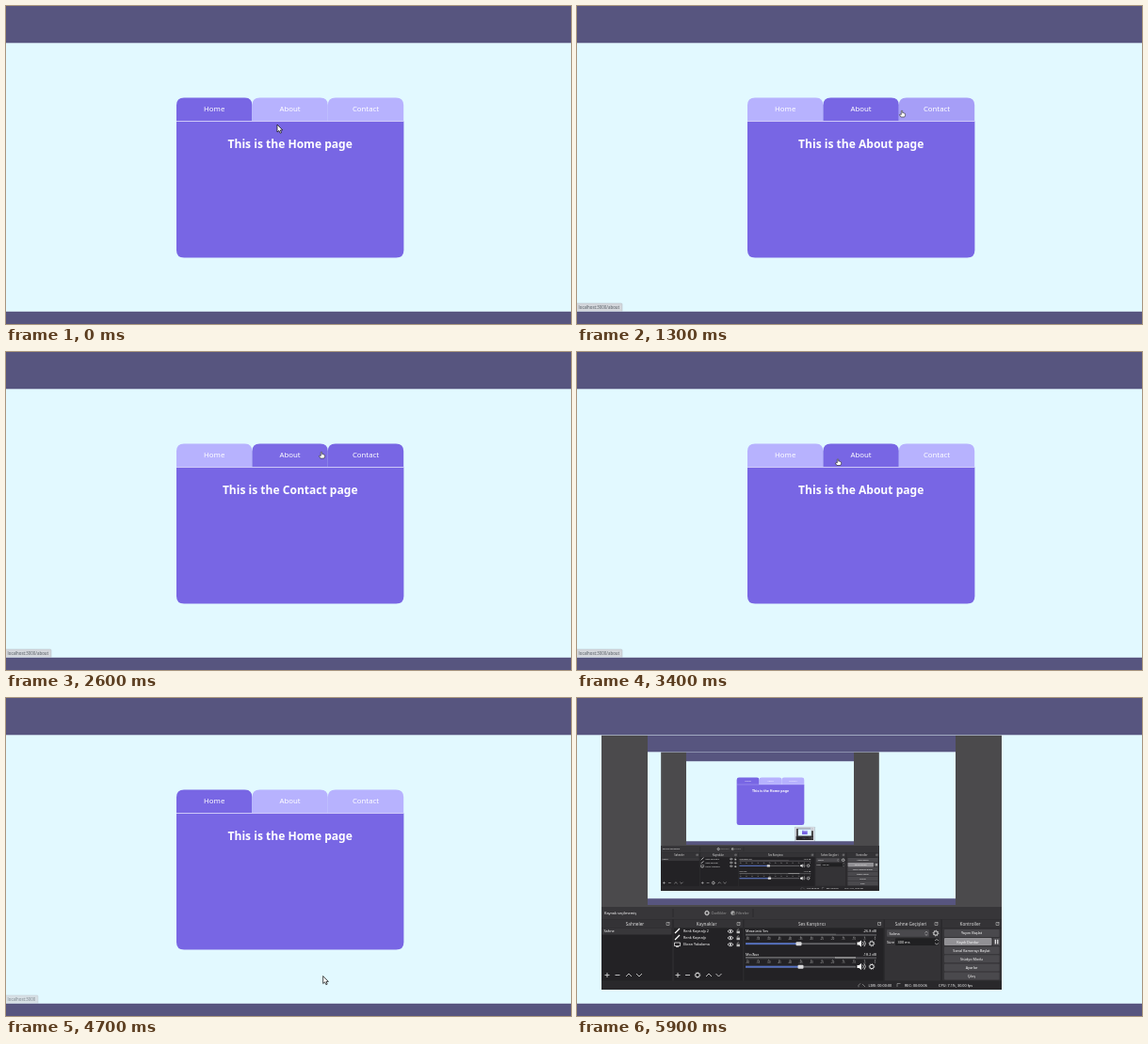
Write an HTML page that moves like this. It is 600 px wide and 338 px high and loops after 6 s.

```html
<!DOCTYPE html>
<html lang="en">
<head>
<meta charset="utf-8">
<title>Tab navigation</title>
<style>
html, body { margin: 0; width: 100%; height: 100%; overflow: hidden; background: #e2f9ff; }
svg { display: block; }
#stage { width: 100vw; height: 100vh; }
text { font-family: "Noto Sans", "Open Sans", sans-serif; }
</style>
</head>
<body>
<svg id="stage" viewBox="0 0 600 338"></svg>
<script>
const DARK = [120, 102, 228], LIGHT = [183, 178, 254];
const TABS = ["Home", "About", "Contact"];
const LOOP = 6000, STEP = 100, FADE = 300;

const rect = (x, y, w, h, fill, extra = "") =>
  `<rect x="${x}" y="${y}" width="${w}" height="${h}" fill="${fill}" ${extra}/>`;
const text = (x, y, s, size, fill = "#fff", anchor = "start", extra = "") =>
  `<text x="${x}" y="${y}" font-size="${size}" fill="${fill}" text-anchor="${anchor}" ${extra}>${s}</text>`;
const line = (d, color = "#e4e4e4", width = .8) =>
  `<path d="${d}" fill="none" stroke="${color}" stroke-width="${width}"/>`;
const mix = k => `rgb(${LIGHT.map((c, i) => Math.round(c + (DARK[i] - c) * k))})`;

function tab(name, i) {
  const x = 181 + i * 80.4;
  return `<path class="tab" fill="${mix(i ? 0 : 1)}"
    d="M${x} 122.5V105.5q0-8 8-8h64.4q8 0 8 8v17z"/>` +
    text(x + 40.2, 111.7, name, 7.8, "#fff", "middle");
}

const page = () => rect(0, 0, 600, 338, "#e2f9ff") + TABS.map(tab).join("") +
  `<path d="M181 122.5h241.4v137q0 8-8 8H189q-8 0-8-8z" fill="${mix(1)}"/>` +
  rect(181, 122, 241.4, .9, "#d5d0fa") +
  text(301.7, 150.6, "This is the Home page", 12.05, "#fff", "middle", 'class="title" font-weight="700"');

const bars = () => rect(0, 0, 600, 39, "#57557f") + rect(0, 39, 600, .8, "#b5bed3") +
  rect(0, 325, 600, 13, "#57557f") + rect(0, 324.4, 600, .6, "#b5bed3");

const gear = (x, y, r = 2.2) =>
  `<circle cx="${x}" cy="${y}" r="${r}" fill="none" stroke="#e4e4e4" stroke-width="1"/>` +
  `<circle cx="${x}" cy="${y}" r="${r + .7}" fill="none" stroke="#e4e4e4" stroke-width=".7" stroke-dasharray="1.1 1.1"/>`;
const plus = x => line(`M${x - 2.5} 294.5h5M${x} 292v5`);
const minus = x => line(`M${x - 2.5} 294.5h5`);
const chevron = (x, up) => line(up ? `M${x - 3} 296l3-3 3 3` : `M${x - 3} 293l3 3 3-3`);

function dock(x, w, title) {
  return rect(x, 235.5, w, 9, "#343336") + rect(x, 244.5, w, 56, "#232225") +
    text(x + w / 2 - 2, 241.8, title, 4.7, "#ddd", "middle") +
    line(`M${x + w - 6} 238.5h3v3h-3zM${x + w - 4.5} 240l1.8-1.8`, "#ccc", .5);
}

function source(name, i) {
  const y = 248 + i * 7;
  const icon = i < 2 ? line(`M104 ${y + 2}l1.5-1.5 3.5-3.5`, "#fff", 1.3)
    : line(`M103.5 ${y - 2}h6v3.5h-6zM105 ${y + 2.5}h3`, "#fff", .7);
  return icon + text(113, y + 1.4, name, 3.75) +
    line(`M160 ${y}q3-3.6 6 0q-3 3.6-6 0`, "#fff", .7) +
    `<circle cx="163" cy="${y}" r=".9" fill="#fff"/>` +
    rect(169.5, y - .4, 3.4, 2.6, "#bbb") + line(`M170.2 ${y - .4}v-1.2q1-1.4 2 0`, "#bbb", .6);
}

function mixer(y, name, level, knob) {
  let ticks = "";
  for (let i = 0; i <= 12; i++) {
    const x = 181 + i * 11.3;
    ticks += `M${x} ${y + 5.4}v1.2`;
  }
  let labels = "";
  for (let i = 0; i < 13; i++) labels += text(181 + i * 11.3, y + 9.4, i < 12 ? i * 5 - 60 : 0, 2.6, "#bbb", "middle");
  return text(179, y + 1.3, name, 3.75) + text(318, y + 1.3, level, 3.75, "#fff", "end") +
    rect(179, y + 2.8, 139, 2, "#4d4c50") + rect(179, y + 2.8, 96, .7, "#777") +
    line(ticks, "#ccc", .4) + labels +
    rect(179, y + 12.3, 117, 1.8, "#656569") + rect(179, y + 12.3, knob - 179, 1.8, "#536fc2") +
    rect(knob - 3, y + 11.2, 6, 4, "#d8d8da", 'rx="1"') +
    `<path d="M297.5 ${y + 11.6}h2l2.5-2v7l-2.5-2h-2z" fill="#fff"/>` +
    line(`M303.4 ${y + 11}q1.8 2 0 4M305 ${y + 9.8}q2.8 3.2 0 6.4`, "#fff", .7) + gear(313, y + 13);
}

function button(label, i) {
  const y = 246 + i * 9.1, on = i === 1;
  return rect(390, y, on ? 50.5 : 58.5, 8, on ? "#929195" : "#4a494d", 'rx="1"') +
    text(on ? 415 : 419, y + 5.4, label, 3.8, "#fff", "middle");
}

// Recorder window whose preview shows the given stage markup.
function recorder(preview) {
  return rect(26, 39, 425, 271, "#4b4a4c") +
    `<svg x="75" y="39" width="327" height="181" viewBox="0 5.5 600 332.1">${preview}</svg>` +
    rect(26, 222, 425, 88, "#2b2a2d") + rect(26, 222, 425, 13, "#373639") +
    text(29, 230, "Kaynak seçilmemiş", 3.85) + line("M102 224v9M187 224v9", "#222", .6) +
    gear(138, 228.5, 1.8) + text(142.5, 230, "Özellikler", 3.75, "#999") +
    `<circle cx="165.5" cy="228.5" r="2.2" fill="#aaa"/><circle cx="166.8" cy="229.3" r="1.5" fill="#666"/>` +
    text(169, 230, "Filtreler", 3.75, "#999") +
    dock(26, 75, "Sahneler") + dock(103, 73, "Kaynaklar") + dock(177.5, 148, "Ses Karıştırıcı") +
    dock(327, 59, "Sahne Geçişleri") + dock(388, 63, "Kontroller") +
    rect(26.5, 244.5, 74, 7, "#38373a") + text(28.5, 249.4, "Sahne", 3.85) +
    ["Renk Kaynağı 2", "Renk Kaynağı", "Ekran Yakalama"].map(source).join("") +
    plus(32) + minus(43) + chevron(55, true) + chevron(66, false) +
    plus(107) + minus(117.5) + gear(128, 294.5) + chevron(140, true) + chevron(150.5, false) +
    mixer(248, "Masaüstü Ses", "-26.8 dB", 235.5) + mixer(272.5, "Mic/Aux", "-18.2 dB", 237.5) +
    rect(274, 275.3, 22, 1.2, "#aaa") +
    rect(327, 244.5, 59, 56, "#343336") + rect(388, 244.5, 63, 56, "#343336") +
    rect(329, 246.3, 45, 7.4, "#4a494d", 'rx="1"') + text(331.5, 251.5, "Solma", 3.85) +
    line("M369.5 249.5l1.5-1.3 1.5 1.3M369.5 251l1.5 1.3 1.5-1.3", "#ddd", .5) + gear(381, 250) +
    text(329, 260.5, "Süre", 3.85) + rect(338, 255.3, 46, 7.6, "#202022", 'rx="1"') +
    text(340.5, 260.6, "300 ms", 3.85) +
    line("M380 258l2-1.6 2 1.6M380 260.5l2 1.6 2-1.6", "#ddd", .6) +
    ["Yayını Başlat", "Kaydı Durdur", "Sanal Kamerayı Başlat", "Stüdyo Modu", "Ayarlar", "Çıkış"].map(button).join("") +
    rect(442, 255.1, 7, 8, "#4a494d") + line("M444.3 256.8v4.6M446.8 256.8v4.6", "#fff", 1.1) +
    rect(26, 301.5, 425, 8.5, "#29282b") +
    line("M299 307.3v-2l2-2M303 304l3 3M340 307v-3.5h3.5", "#aaa", .6) +
    text(309.5, 307.3, "LIVE: 00:00:00", 3.8) + text(348, 307.3, "REC: 00:00:06", 3.8) +
    text(384, 307.3, "CPU: 7.1%, 30.00 fps", 3.8);
}

const thumbnail = content =>
  rect(387.5, 273.5, 74, 56, "#6d7c86", 'opacity=".22" rx="1.5"') +
  rect(389, 274.8, 70.5, 54, "#a4acb4") + rect(389.7, 275.4, 69.1, 54, "#dfe5ec") +
  rect(446.5, 276, 11.5, 12, "#d2d5dc") +
  `<svg x="393" y="279" width="62" height="42" viewBox="26 39 425 271" preserveAspectRatio="none">${content}</svg>` +
  rect(446, 276, 12, 12, "#dcdfe6") + line("M449.4 279.7l4.8 4.8M454.2 279.7l-4.8 4.8", "#444", .7);

const plain = page() + bars();
const hovered = page() + thumbnail(recorder(plain)) + bars();
const nested = page() + recorder(hovered) + bars();

document.getElementById("stage").innerHTML =
  `<g id="live">${page()}</g>
  <g id="status">${rect(-1, 316, 49, 10, "#d4d7dc", 'stroke="#b3bbc2" stroke-width=".5" rx="1"')}
    ${text(1.6, 321.9, "", 4.4, "#555c63")}</g>
  <g id="thumb">${thumbnail(recorder(hovered))}</g>
  <g id="recorder">${recorder(nested)}</g>
  <g id="arrow"><path d="M0 0V8L1.9 6.4 3.2 9.2 4.5 8.6 3.3 5.9H5.7Z" fill="#fff" stroke="#111" stroke-width=".75"/></g>
  <g id="hand"><path d="M-.7 .5Q0-.5 .7 .5V2.7Q2 2.3 2.4 3 3.6 3 3.6 4.2V5.2L2.8 7H-1.1L-2.6 4.5Q-2.3 3.5-.7 4.5Z" fill="#fff" stroke="#222" stroke-width=".6"/></g>
  ${bars()}`;

const get = id => document.getElementById(id);
const live = get("live"), status = get("status"), arrow = get("arrow"), hand = get("hand");
const tabs = live.querySelectorAll(".tab"), title = live.querySelector(".title");
const statusBox = status.querySelector("rect"), statusText = status.querySelector("text");

// Moments at which each tab starts to fade between its two colours.
const toggles = [[900, 3400], [150, 1900, 2350, 3800], [1250, 3000]];
const titles = [[0, "Home"], [1000, "About"], [2000, "Contact"], [3100, "About"], [3900, "Home"]];
const links = [[0, "", 0], [300, "/about", 48], [1400, "/contact", 51.5], [2500, "/about", 48], [3600, "", 34]];
const pointer = [
  [0, 288, 126], [200, 290, 119], [600, 290, 111], [900, 289, 110], [1100, 292, 110],
  [1300, 345, 111], [1500, 387, 112], [1700, 362, 110], [2000, 362, 110], [2200, 350, 109],
  [2600, 335, 106], [2800, 294, 105], [3000, 294, 105], [3400, 277, 113.5], [3500, 255, 113],
  [3700, 225, 110], [4000, 210, 112], [4400, 214, 113], [4500, 235, 148], [4600, 300, 250],
  [4700, 336.7, 295.5], [4900, 385, 309], [5100, 427, 317], [5200, 418, 321], [5300, 414, 332]
];

const latest = (list, t) => list.filter(item => item[0] <= t).pop();
const clamp = v => Math.min(1, Math.max(0, v));

function tabLevel(times, initial, t) {
  const past = times.filter(s => s <= t);
  if (!past.length) return initial;
  const p = 1 - (1 - clamp((t - past[past.length - 1]) / FADE)) ** 1.7;
  const to = (initial + past.length) % 2;
  return to ? p : 1 - p;
}

function pointerAt(t) {
  const i = pointer.findIndex(k => k[0] > t);
  if (i < 0) return pointer[pointer.length - 1].slice(1);
  const [a, b] = [pointer[i - 1], pointer[i]], p = (t - a[0]) / (b[0] - a[0]);
  return [a[1] + (b[1] - a[1]) * p, a[2] + (b[2] - a[2]) * p];
}

function draw(t) {
  tabs.forEach((el, i) => el.setAttribute("fill", mix(tabLevel(toggles[i], i ? 0 : 1, t))));
  title.textContent = `This is the ${latest(titles, t)[1]} page`;

  const [, path, width] = latest(links, t);
  statusText.textContent = "localhost:3000" + path;
  statusBox.setAttribute("width", width + 1);
  status.setAttribute("opacity", t < 300 ? 0 : clamp((4900 - t) / 280));

  const [x, y] = pointerAt(t);
  const onTab = y > 97 && y < 122 && x > 181 && x < 422;
  for (const el of [arrow, hand]) el.setAttribute("transform", `translate(${x} ${y})`);
  arrow.setAttribute("opacity", onTab || t >= 5300 ? 0 : 1);
  hand.setAttribute("opacity", onTab ? 1 : 0);

  get("thumb").setAttribute("opacity", t >= 5900 ? 0 : clamp((t - 5600) / 160));
  get("recorder").style.display = t >= 5900 ? "" : "none";
}

function tick() {
  draw(Math.floor(performance.now() % LOOP / STEP) * STEP);
  requestAnimationFrame(tick);
}
tick();
</script>
</body>
</html>
```
